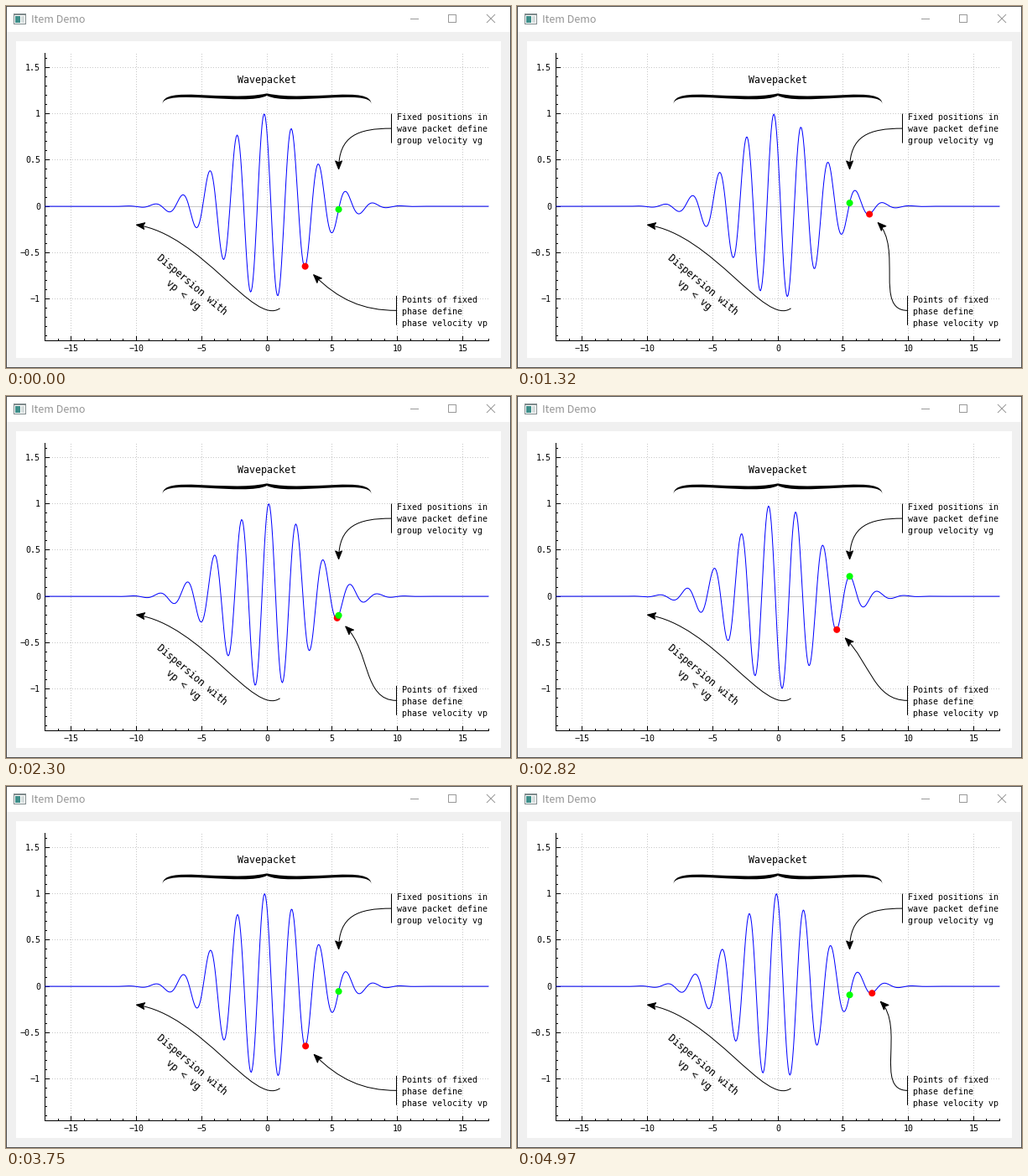
Animation, 602 px wide and 432 px high, one loop 5.07 s. Source, as a matplotlib script:

```python
import numpy as np
import matplotlib.pyplot as plt
from matplotlib.animation import FuncAnimation
from matplotlib.patches import Circle, PathPatch, Polygon, Rectangle
from matplotlib.path import Path

W, H, DPI = 602, 432, 64
PT = 72 / DPI                      # points per pixel
FRAMES, INTERVAL = 195, 26         # 5070 ms
K, SPEED, KEY0 = 3, 5, 2.932       # wave number, phase speed, first tracer key
MONO = "DejaVu Sans Mono"

# replots come every 50 ms, but three in each 16 are a screen refresh early
steps = np.arange(107)
REPLOTS = 10 * np.round(5 * steps - 5 / 3 * (3 * (steps + 2) // 16))

fig = plt.figure(figsize=(W / DPI, H / DPI), dpi=DPI, facecolor="#f0f0f0")
ax = fig.add_axes([0, 0, 1, 1])
ax.set(xlim=(0, W), ylim=(H, 0))
ax.axis("off")


def px(x):
    return 46.5 + (x + 17) * 529 / 34


def py(y):
    return 399.5 - (y + 1.45) * 343 / 3.1


def crisp(p):
    """Centre of the pixel that a hard-edged line falls on."""
    return np.floor(p) + 0.5


def point(x, y):
    return np.array([px(x), py(y)])


def line(xs, ys, color="black", **kw):
    kw.setdefault("lw", PT)
    kw.setdefault("snap", False)
    return ax.plot(xs, ys, color=color, solid_capstyle="butt",
                   dash_capstyle="butt", **kw)[0]


def box(x, y, w, h, color):
    ax.add_patch(Rectangle((x, y), w, h, fc=color, lw=0))


def label(x, y, text, advance=6, **kw):
    """Monospaced text with the given character advance in pixels."""
    kw.setdefault("va", "baseline")
    ax.text(x, y, text, family=MONO, size=advance / 0.602 * PT, zorder=4, **kw)


def number(v):
    return f"{v:g}".replace("-", "\u2212")


def cubic(*pts):
    codes = [Path.MOVETO] + [Path.CURVE4] * (len(pts) - 1)
    return Path(pts, codes)


def spike(tip, toward):
    """Corners of an arrow head at tip, pointing along toward."""
    d = toward / np.hypot(*toward)
    side = 4 * np.array([-d[1], d[0]])
    back = tip - 10 * d
    return [tip, back + side, tip - 8 * d, back - side]


class Arrow:
    def __init__(self, *pts):
        self.curve = PathPatch(cubic(*pts), fc="none", ec="black", lw=PT,
                               capstyle="butt", zorder=5)
        self.head = Polygon(spike(pts[3], pts[3] - pts[2]), fc="black",
                            ec="black", lw=PT, joinstyle="miter", zorder=5)
        ax.add_patch(self.curve)
        ax.add_patch(self.head)

    def move(self, *pts):
        self.curve.set_path(cubic(*pts))
        self.head.set_xy(spike(pts[3], pts[3] - pts[2]))


def draw_window():
    box(0, 0, W, 31, "white")
    box(12, 42, 578, 378, "white")
    for x, y, w, h in ((0, 0, W, 1), (0, H - 1, W, 1), (0, 0, 1, H), (W - 1, 0, 1, H)):
        box(x, y, w, h, "#505050")

    # small window icon
    box(9, 9, 15, 13, "#7f8a8c")
    box(10, 11, 13, 10, "white")
    box(11, 12, 6, 8, "#3f8f8a")
    box(18, 12, 4, 8, "#d4dcdc")

    ax.text(30, 20, "Item Demo", family="Noto Sans CJK JP", size=12.6 * PT,
            color="#969696", va="baseline")
    grey = "#999999"
    line([482, 492], [15.5, 15.5], grey)
    line([527.5, 536.5, 536.5, 527.5, 527.5], [10.5, 10.5, 19.5, 19.5, 10.5], grey)
    line([573, 583], [10, 20], grey)
    line([573, 583], [20, 10], grey)


def draw_axes():
    grid = "#c8c8c8"
    dots = (0, (1, 2))
    for v in range(-15, 16, 5):
        x = crisp(px(v))
        line([x, x], [400, 57], grid, ls=dots)
        label(px(v), 412, number(v), ha="center")
    for v in np.arange(-2, 4) / 2:
        y = crisp(py(v))
        line([46, 575], [y, y], grid, ls="-" if v == 0 else dots)
        label(41, y + 3.5, number(v), ha="right")

    line([46, 576], [399.5, 399.5])
    line([46.5, 46.5], [56, 400])
    for v in range(-16, 18):
        x = crisp(px(v))
        line([x, x], [399, 394 if v % 5 == 0 else 397])
    for i in range(-14, 17):
        y = crisp(py(i / 10))
        line([47, 52 if i % 5 == 0 else 49], [y, y])


def draw_bracket():
    left, right = point(-8, 1.1), point(8, 1.1)
    w = (right - left) / 2
    d = np.array([0, 13])
    c = (left + right) / 2 - d
    shape = cubic(c + w + d,
                  c + w - 0.8 * d, c + 0.4 * w + 0.8 * d, c,
                  c - 0.4 * w + 0.8 * d, c - w - 0.8 * d, c - w + d,
                  c - w - 0.5 * d, c - 0.2 * w + 1.2 * d, c + 0.2 * d,
                  c + 0.2 * w + 1.2 * d, c + w - 0.5 * d, c + w + d)
    ax.add_patch(PathPatch(shape, fc="black", lw=0, zorder=4))
    label(310.5, 92, "Wavepacket", 7, ha="center")


def draw_note(anchor, baseline, lines):
    """Text lines with the bar that starts their arrow."""
    x, y = anchor
    line([x, x], [y - 17.5, y + 17.5], zorder=5)
    for i, text in enumerate(lines):
        label(x + 7, baseline + 14 * i, text)


def draw_dispersion():
    Arrow(point(1, -1.1), point(-1, -1.3), point(-5, -0.3), point(-10, -0.2))
    angle = np.radians(40)
    down = 7.5 * np.array([-np.sin(angle), np.cos(angle)])
    mid = point(-6.1, -0.9)
    for pos, text in ((mid - down, "Dispersion with"), (mid + down, "vp < vg")):
        label(*pos, text, 7, ha="center", va="center",
              rotation=-40, rotation_mode="anchor")


LEFT40 = np.array([-40, 0])
group_start = np.array([459.5, 146.1])
group_end = point(5.5, 0.4)
phase_start = np.array([465.5, 363.35])

draw_window()
draw_axes()
draw_bracket()
draw_dispersion()
draw_note(group_start, 136,
          ("Fixed positions in", "wave packet define", "group velocity vg"))
draw_note(phase_start, 354,
          ("Points of fixed", "phase define", "phase velocity vp"))

Arrow(group_start, group_start + LEFT40, group_end - [0, 40], group_end)
phase_arrow = Arrow(phase_start, phase_start + LEFT40, phase_start, phase_start - 50)

xs = np.linspace(-17, 17, 500)
envelope = np.exp(-xs**2 / 20)
wave = line(px(xs), py(0 * xs), "#0000ff", zorder=3)
red = ax.add_patch(Circle((0, 0), 4, fc="#ff0000", lw=0, zorder=6))
green = ax.add_patch(Circle((0, 0), 4, fc="#00ff00", lw=0, zorder=7))


def update(i):
    # the last replot that falls before the frame ends
    t = REPLOTS[REPLOTS < (i + 1) * INTERVAL][-1] / 1000
    trough = KEY0 - SPEED * t / K
    ys = envelope * np.sin(K * (xs - trough) + 1.5 * np.pi)
    wave.set_ydata(py(ys))

    # the red tracer rides one trough, then jumps three waves to the right
    low = 2 * np.pi / 3
    key = low + (trough - low) % (2 * np.pi)
    pos = point(key, np.interp(key, xs, ys))
    red.set_center(pos)
    green.set_center(point(5.5, np.interp(5.5, xs, ys)))
    phase_arrow.move(phase_start, phase_start + LEFT40, pos + 40, pos + 10)
    return wave, red, green, phase_arrow.curve, phase_arrow.head


anim = FuncAnimation(fig, update, frames=FRAMES, interval=INTERVAL,
                     repeat=True, repeat_delay=0, blit=False)
plt.show()
```
